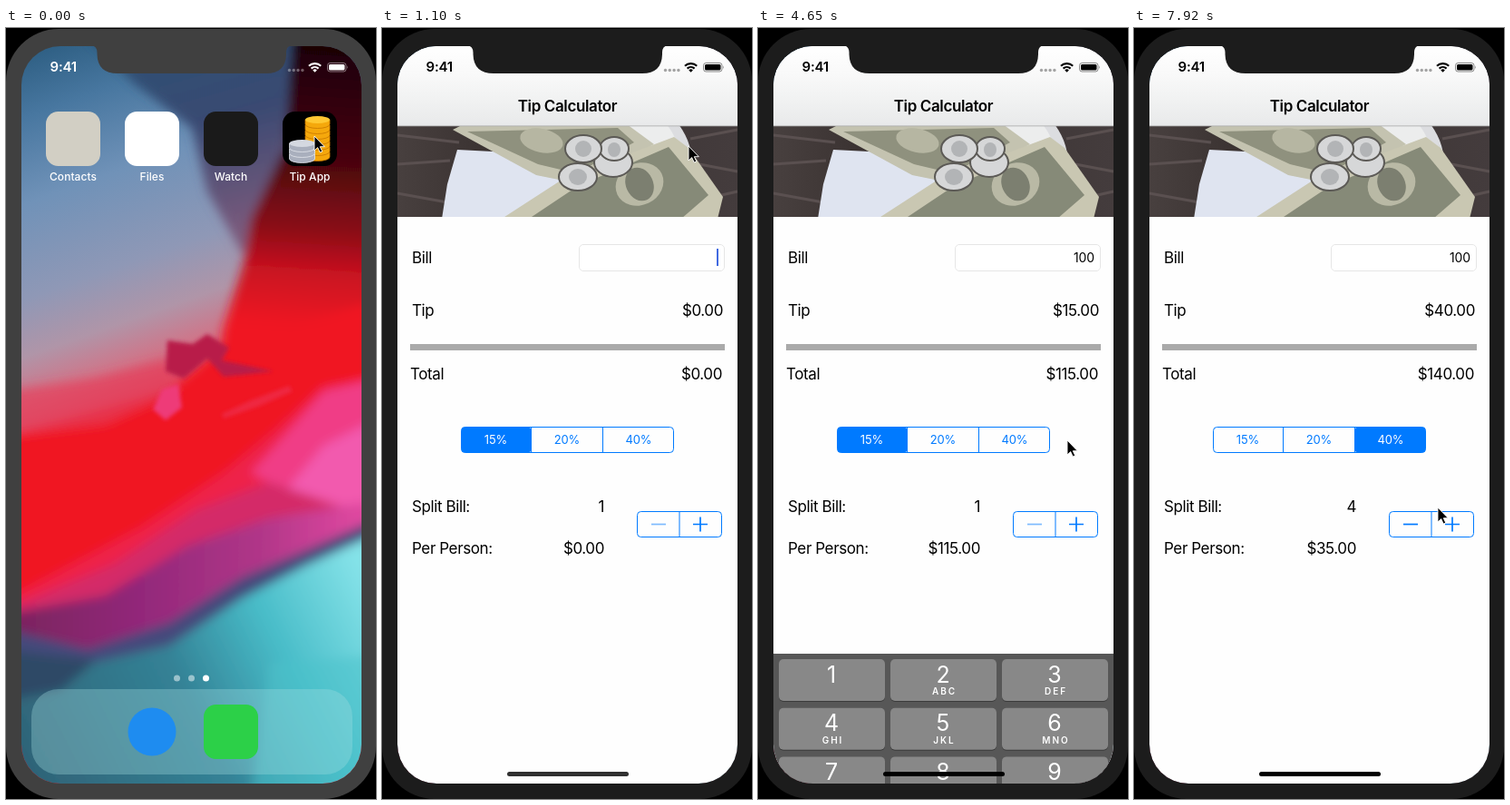
An HTML page for the animation above (8000 ms loop, 408 by 849 pixels).

```html
<!DOCTYPE html>
<html lang="en">
<head>
<meta charset="utf-8">
<title>Tip Calculator</title>
<style>
  html, body { margin: 0; width: 100%; height: 100%; overflow: hidden; background: #000; }
  svg { display: block; width: 408px; height: 849px; font-family: Inter, "Open Sans", sans-serif; }
  .form { font-size: 17px; letter-spacing: -.4px; fill: #000; }
  .label { font-size: 12px; font-weight: 500; text-anchor: middle; fill: #fff; letter-spacing: .05px; }
  .end { text-anchor: end; }
  .seg { font-size: 13px; text-anchor: middle; letter-spacing: -.1px; }
  .line { fill: none; stroke: #007aff; }
  .digit { font-size: 25px; text-anchor: middle; fill: #fff; }
  .abc { font-size: 10px; font-weight: 600; letter-spacing: 2px; text-anchor: middle; fill: #fff; }
</style>
</head>
<body>
<svg viewBox="0 0 408 849">
  <defs>
    <clipPath id="screen"><rect x="17" y="20" width="375" height="812" rx="43"/></clipPath>
    <clipPath id="window"><rect id="win"/></clipPath>
    <clipPath id="banner"><rect x="17" y="108" width="375" height="100"/></clipPath>
    <filter id="soft" x="-20%" y="-20%" width="140%" height="140%"><feGaussianBlur stdDeviation="6"/></filter>
    <filter id="fine"><feGaussianBlur stdDeviation="2"/></filter>
    <filter id="photo"><feGaussianBlur stdDeviation=".7"/></filter>

    <linearGradient id="sky" gradientUnits="userSpaceOnUse" x1="0" y1="0" x2="165" y2="470">
      <stop offset=".05" stop-color="#2b5c80"/><stop offset=".2" stop-color="#4877a0"/>
      <stop offset=".38" stop-color="#7092b8"/><stop offset=".58" stop-color="#8f98b6"/>
      <stop offset=".7" stop-color="#b095a8"/><stop offset=".79" stop-color="#d07488"/>
      <stop offset=".87" stop-color="#e2445c"/><stop offset=".95" stop-color="#f01424"/>
    </linearGradient>
    <linearGradient id="maroon" gradientUnits="userSpaceOnUse" x1="350" y1="20" x2="330" y2="330">
      <stop offset="0" stop-color="#1c0206"/><stop offset=".4" stop-color="#48060e"/>
      <stop offset=".65" stop-color="#8a0a16"/><stop offset=".8" stop-color="#c81220"/>
      <stop offset="1" stop-color="#f01422"/>
    </linearGradient>
    <linearGradient id="navy" x1="0" y1="0" x2=".3" y2="1">
      <stop offset="0" stop-color="#2a5274"/><stop offset=".5" stop-color="#3a4a72"/>
      <stop offset="1" stop-color="#7a5a7c"/>
    </linearGradient>
    <linearGradient id="violet" gradientUnits="userSpaceOnUse" x1="17" y1="0" x2="392" y2="0">
      <stop offset="0" stop-color="#7c2460"/><stop offset=".35" stop-color="#92287a"/>
      <stop offset=".7" stop-color="#b03688"/><stop offset="1" stop-color="#e048a0"/>
    </linearGradient>
    <linearGradient id="sea" gradientUnits="userSpaceOnUse" x1="17" y1="790" x2="392" y2="600">
      <stop offset="0" stop-color="#2f6478"/><stop offset=".45" stop-color="#348296"/>
      <stop offset=".72" stop-color="#48bcc8"/><stop offset="1" stop-color="#84e2e8"/>
    </linearGradient>
    <linearGradient id="nav" x1="0" y1="0" x2="0" y2="1">
      <stop offset="0" stop-color="#fff"/><stop offset=".35" stop-color="#f9f9f9"/>
      <stop offset=".7" stop-color="#f0f1f1"/><stop offset="1" stop-color="#e8e9ea"/>
    </linearGradient>
    <linearGradient id="wood" x1="0" y1="0" x2="1" y2="0">
      <stop offset="0" stop-color="#48403f"/><stop offset=".3" stop-color="#38302f"/>
      <stop offset="1" stop-color="#443c3d"/>
    </linearGradient>

    <g id="status" fill="currentColor">
      <text x="48.500" y="48" font-size="15" font-weight="600" letter-spacing="-.2">9:41</text>
      <g opacity=".35">
        <circle cx="312.500" cy="46.500" r="1.700"/><circle cx="317.300" cy="46.500" r="1.700"/>
        <circle cx="322.100" cy="46.500" r="1.700"/><circle cx="326.900" cy="46.500" r="1.700"/>
      </g>
      <path d="M334 41.800a9.600 9.600 0 0 1 13.200 0M336.600 44.600a5.800 5.800 0 0 1 8 0"
            fill="none" stroke="currentColor" stroke-width="2.200"/>
      <path d="M338.300 46.400a3.400 3.400 0 0 1 4.600 0L340.600 48.800Z"/>
      <rect x="354.500" y="38.500" width="20.500" height="9.500" rx="2.800" fill="none" stroke="currentColor" opacity=".45"/>
      <path d="M376 41.500q1.600 1.800 0 3.600z" opacity=".45"/>
      <rect x="356" y="40" width="17.500" height="6.500" rx="1.500"/>
    </g>
  </defs>

  <rect id="body" y="1" width="408" height="848" rx="58"/>

  <g clip-path="url(#screen)">
    <g id="wallpaper">
      <rect x="17" y="20" width="375" height="812" fill="url(#sky)"/>
      <g filter="url(#soft)">
        <path d="M90 10H345L312 110 285 200 262 250 222 180 205 110 140 60Z" fill="url(#navy)"/>
        <path d="M316 0H410V440H225L240 330 262 260 270 210 308 130Z" fill="url(#maroon)"/>
        <path d="M0 450 180 400 240 350 410 300V600L0 640Z" fill="#f01422"/>
        <path d="M0 400 100 385 180 365 190 400 110 436 0 450Z" fill="#e4405c" opacity=".7"/>
        <path d="M410 385 350 395 300 440 240 490 150 550 0 630V670H410Z" fill="#ee2048"/>
        <path d="M410 385 350 400 315 440 270 490 410 560Z" fill="#f03c86"/>
        <path d="M410 430 350 460 300 520 410 540Z" fill="#f25aae"/>
        <path d="M0 640 120 590 210 530 290 500 410 540V640L180 690 0 700Z" fill="#d42a68"/>
        <path d="M0 645 110 625 200 570 290 540 410 520V590L240 650 100 690 0 675Z" fill="url(#violet)"/>
        <path d="M0 662 90 684 180 655 260 605 330 575 410 540V850H0Z" fill="#44497c"/>
        <path d="M0 684 90 700 180 680 260 628 330 592 410 556V850H0Z" fill="url(#sea)"/>
        <path d="M0 685 100 696 60 730 0 740Z" fill="#2f4866"/>
        <path d="M290 700 270 850H410V690Z" fill="#4cc4cc" opacity=".5"/>
      </g>
      <g filter="url(#fine)">
        <path d="M178 344 206 348 222 337 246 352 238 366 295 378 240 384 222 364 196 386 176 378Z" fill="#b81e4a"/>
        <path d="M172 398 190 392 194 418 176 432 162 420Z" fill="#ee3a78"/>
        <path d="M238 425 270 410 312 394 316 400 280 416 240 430Z" fill="#ee3050" opacity=".7"/>
      </g>
    </g>

    <g id="home">
      <g id="icons"></g>
      <g fill="#fff">
        <circle cx="188.500" cy="716" r="3.500" opacity=".5"/><circle cx="204.500" cy="716" r="3.500" opacity=".5"/>
        <circle cx="220.500" cy="716" r="3.500"/>
      </g>
      <rect x="28" y="728" width="354" height="94" rx="30" fill="#a4dce0" opacity=".33"/>
      <circle cx="161" cy="775" r="26.500" fill="#1e8cf0"/>
      <rect x="218" y="745" width="60" height="60" rx="13.500" fill="#2cd048"/>
      <use href="#status" color="#fff"/>
    </g>
    <rect id="dim" x="17" y="20" width="375" height="812"/>

    <g id="app" clip-path="url(#window)">
      <g id="view">
        <rect x="17" y="20" width="375" height="812" fill="#fefefe"/>
        <g id="content">
          <rect x="17" y="20" width="375" height="88" fill="url(#nav)"/>
          <text x="204.500" y="92" text-anchor="middle" font-size="17" font-weight="600" letter-spacing="-.38">Tip Calculator</text>

          <g clip-path="url(#banner)">
            <rect x="17" y="108" width="375" height="100" fill="url(#wood)"/>
            <g filter="url(#photo)">
              <path d="M17 118 85 126M17 150 75 146M17 182 72 192M340 122 392 112M350 150 392 158M370 185 392 180" stroke="#5a5050" stroke-width="3"/>
              <path d="M83 134 72 172 66 210H250L200 140Z" fill="#dfe4f0"/>
              <ellipse cx="278" cy="150" rx="64" ry="68" fill="#dcdde0"/>
              <ellipse cx="276" cy="146" rx="52" ry="58" fill="#eceded"/>
              <path d="M78 112 90 106H270L300 128 220 172 170 162Z" fill="#c4c3b0"/>
              <path d="M94 114 260 110 278 126 214 160 172 150Z" fill="#8f917e"/>
              <ellipse cx="176" cy="124" rx="24" ry="13" fill="#b6b6a2" transform="rotate(12 176 124)"/>
              <path d="M132 210 200 166 322 120 338 132 376 186 370 210Z" fill="#c9c7b2"/>
              <path d="M162 210 216 174 316 131 360 184 330 210Z" fill="#868a78"/>
              <ellipse cx="284" cy="172" rx="27" ry="23" fill="#b9b9a5" transform="rotate(-25 284 172)"/>
              <ellipse cx="284" cy="172" rx="15" ry="19" fill="#7c7f70" transform="rotate(-25 284 172)"/>
              <g fill="#d6d7d8" stroke="#5c5a56" stroke-width="2">
                <ellipse cx="255" cy="148" rx="21" ry="16"/><ellipse cx="256" cy="133" rx="16" ry="13"/>
                <ellipse cx="222" cy="133" rx="20" ry="15"/><ellipse cx="216" cy="164" rx="21" ry="15"/>
              </g>
              <g fill="#b2b4b6">
                <ellipse cx="222" cy="133" rx="9" ry="9"/><ellipse cx="216" cy="164" rx="10" ry="9"/>
                <ellipse cx="256" cy="134" rx="7" ry="8"/>
              </g>
            </g>
          </g>
          <rect x="17" y="107.500" width="375" height=".8" fill="#a8a8a8"/>

          <g class="form">
            <text x="33" y="259">Bill</text>
            <text x="33" y="317">Tip</text>
            <text x="31" y="387">Total</text>
            <text x="33" y="533">Split Bill:</text>
            <text x="33" y="579">Per Person:</text>
            <text id="tip" class="end" x="376" y="317"></text>
            <text id="total" class="end" x="375" y="387"></text>
            <text id="split" class="end" x="245" y="533"></text>
            <text id="each" class="end" x="245" y="579"></text>
          </g>
          <rect x="217.500" y="238.500" width="160" height="29" rx="4.500" fill="#fff" stroke="#e6e6e6"/>
          <text id="bill" class="end" x="371" y="257.500" font-size="14" letter-spacing="-.1"></text>
          <rect id="caret" x="369" y="243" width="2" height="19" fill="#4169e0"/>
          <rect x="31" y="348" width="347" height="7" fill="#aaa"/>

          <g id="segments"></g>
          <rect class="line" x="87.500" y="439.500" width="234" height="28" rx="4"/>
          <path class="line" d="M164.500 439V468M243.500 439V468"/>

          <rect class="line" x="281.500" y="532.500" width="93" height="28" rx="4"/>
          <path class="line" d="M328 532V561"/>
          <path id="minus" class="line" d="M297 546.500H313" stroke-width="1.700"/>
          <path class="line" d="M343 546.500H359M351 538.500V554.500" stroke-width="1.700"/>

          <g id="keyboard"><rect x="17" y="541" width="375" height="291" fill="#575757"/></g>
          <rect id="bar" x="138" y="819" width="134" height="5" rx="2.500"/>
        </g>
        <use href="#status" color="#000"/>
      </g>
    </g>
  </g>

  <path id="notch" d="M94 19Q100.500 20 100.500 27V29Q101 50 123 50H287Q308.500 50 309 29V27Q309 20 315 19Z"/>
  <path id="cursor" d="M0 0V16L3.700 12.600 6.200 18 8.800 17 6.300 11.700H11.300Z" stroke="#fff" stroke-width=".9"/>
</svg>

<script>
const LOOP = 8000, START = 500, STEP = 148;
const $ = id => document.getElementById(id);
const set = (el, attrs) => {
  for (const name in attrs) el.setAttribute(name, attrs[name]);
  return el;
};
const add = (parent, tag, attrs, text = '') => {
  const el = set(document.createElementNS('http://www.w3.org/2000/svg', tag), attrs);
  el.textContent = text;
  return parent.appendChild(el);
};

// Home screen icons
[['Contacts', '#d2cfc4'], ['Files', '#fff'], ['Watch', '#1a1a1a'], ['Tip App', '#000']].forEach(([name, fill], i) => {
  const x = 44 + 87 * i;
  add($('icons'), 'rect', { x, y: 92, width: 60, height: 60, rx: 13.5, fill });
  add($('icons'), 'text', { x: x + 30, y: 168, class: 'label' }, name);
});
function coins(cx, top, count, rx, side, edge, face) {
  for (let i = count - 1; i >= 0; i--) {
    const y = top + i * 6;
    const d = `M${cx - rx} ${y}v5a${rx} 4.500 0 0 0 ${2 * rx} 0v-5z`;
    add($('icons'), 'path', { d, fill: side, stroke: edge, 'stroke-width': .8 });
  }
  add($('icons'), 'ellipse', { cx, cy: top, rx, ry: 4, fill: face });
}
coins(343.5, 101, 7, 13.5, '#f5a80c', '#c87800', '#ffc832');
coins(326.5, 127, 3, 14, '#a9afbd', '#e4e6ec', '#d4d8e0');
const press = add($('icons'), 'rect', { x: 305, y: 92, width: 60, height: 60, rx: 13.5, opacity: 0 });

// Tip choices
const segments = [[.15, 87.5, 77, 125.5], [.2, 164.5, 79, 204], [.4, 243.5, 78, 283]].map(([rate, x, width, mid]) => ({
  rate,
  box: add($('segments'), 'rect', { x, y: 439.5, width, height: 28, rx: rate === .2 ? 0 : 4, fill: '#007aff' }),
  text: add($('segments'), 'text', { x: mid, y: 458.3, class: 'seg' }, rate * 100 + '%'),
}));

// Number pad
const keys = {};
['1', '2ABC', '3DEF', '4GHI', '5JKL', '6MNO', '7PQRS', '8TUV', '9WXYZ', '', '0'].forEach((key, i) => {
  if (!key) return;
  const x = 23 + 123 * (i % 3), y = 547 + 53.7 * Math.floor(i / 3), mid = x + 58;
  const pad = $('keyboard');
  add(pad, 'rect', { x, y: y + 1, width: 117, height: 46, rx: 5, fill: '#3c3c3c' });
  keys[key[0]] = add(pad, 'rect', { x, y, width: 117, height: 46, rx: 5 });
  add(pad, 'text', { x: mid, y: y + (key === '0' ? 31 : 25.5), class: 'digit' }, key[0]);
  add(pad, 'text', { x: mid + 1.5, y: y + 39.3, class: 'abc' }, key.slice(1));
});
add($('keyboard'), 'text', { x: 78, y: 737, class: 'digit' }, '.');
add($('keyboard'), 'path', {
  d: 'M319 730 326 722.500H338.500Q341 722.500 341 725V735Q341 737.500 338.500 737.500H326ZM329 726.500 336 733.500M336 726.500 329 733.500',
  fill: 'none', stroke: '#fff', 'stroke-width': 1.4, 'stroke-linejoin': 'round',
});

// Rows of time followed by values, joined linearly
const cursorPath = [
  [0, 340, 119], [500, 340, 119], [796, 340, 121], [1092, 338, 130], [1536, 235, 345], [1832, 122, 505],
  [1980, 95, 541], [2276, 95, 541], [2720, 180, 712], [2868, 191, 715], [3460, 191, 715],
  [3904, 215, 650], [4200, 262, 531], [4348, 341, 454], [4644, 341, 454], [5088, 212, 454],
  [5532, 212, 454], [5828, 323, 560], [5976, 343, 546], [6716, 343, 546], [7012, 286, 453],
  [7456, 286, 453], [7752, 319, 512], [7900, 335, 528],
];
const windowPath = [[500, 305, 92, 60, 60, 13], [648, 150, 62, 218, 430, 34], [796, 32, 33, 359, 755, 44], [944, 17, 20, 375, 812, 43]];
const keyboardDrop = [[1092, 291], [1240, 110], [1388, 15], [1536, 0], [4496, 0], [4644, 148], [4792, 262], [4940, 291]];
const dimming = [[500, 0], [796, .5]];

function track(rows, t) {
  const next = rows.findIndex(row => row[0] > t);
  if (next === 0) return rows[0].slice(1);
  if (next < 0) return rows[rows.length - 1].slice(1);
  const a = rows[next - 1], b = rows[next], p = (t - a[0]) / (b[0] - a[0]);
  return a.slice(1).map((v, i) => v + (b[i + 1] - v) * p);
}
// Latest value whose time has come
const latest = (rows, t) => rows.reduce((value, row) => t >= row[0] ? row[1] : value, '');
const money = value => '$' + value.toFixed(2);

function draw(t) {
  const shell = t < START ? '#404040' : '#1c1c1c';
  set($('body'), { fill: shell });
  set($('notch'), { fill: shell });

  const [dim] = track(dimming, t);
  set($('dim'), { opacity: dim });
  set($('home'), { opacity: 1 - dim * 2 });
  set(press, { opacity: t < START ? 0 : .45 });

  const [x, y, width, height, rx] = track(windowPath, t);
  set($('win'), { x, y, width, height, rx });
  set($('view'), { transform: `translate(${x} ${y}) scale(${width / 375}) translate(-17 -20)` });
  set($('app'), { visibility: t > START ? 'visible' : 'hidden' });
  set($('content'), { opacity: t < 1092 ? 0 : 1 });

  const bill = latest([[2276, '1'], [3164, '10'], [3312, '100']], t);
  const rate = latest([[0, .15], [5532, .2], [7160, .4]], t);
  const people = latest([[0, 1], [6124, 2], [6272, 3], [6568, 4]], t);
  const total = bill * (1 + rate);
  $('bill').textContent = bill;
  $('tip').textContent = money(bill * rate);
  $('total').textContent = money(total);
  $('split').textContent = people;
  $('each').textContent = money(total / people);
  set($('minus'), { opacity: people > 1 ? 1 : .5 });
  set($('caret'), { opacity: t < 4348 && (t + 150) % 1000 < 480 ? 1 : 0 });
  for (const s of segments) {
    set(s.box, { opacity: s.rate === rate ? 1 : 0 });
    set(s.text, { fill: s.rate === rate ? '#fff' : '#007aff' });
  }

  const pressed = latest([[2128, '1'], [2276, ''], [3164, '0'], [3312, '']], t);
  for (const k in keys) set(keys[k], { fill: k === pressed ? '#5f5f5f' : '#888' });
  set($('keyboard'), { transform: `translate(0 ${track(keyboardDrop, t)})` });
  set($('bar'), { fill: t < 4644 ? '#303030' : '#000' });

  const [cx, cy] = track(cursorPath, t);
  set($('cursor'), { transform: `translate(${cx} ${cy})` });
}

// The screen refreshes in coarse steps
const begin = performance.now();
function tick() {
  const t = (performance.now() - begin) % LOOP;
  draw(t < START ? 0 : START + Math.floor((t - START) / STEP) * STEP);
  requestAnimationFrame(tick);
}
tick();
</script>
</body>
</html>
```
